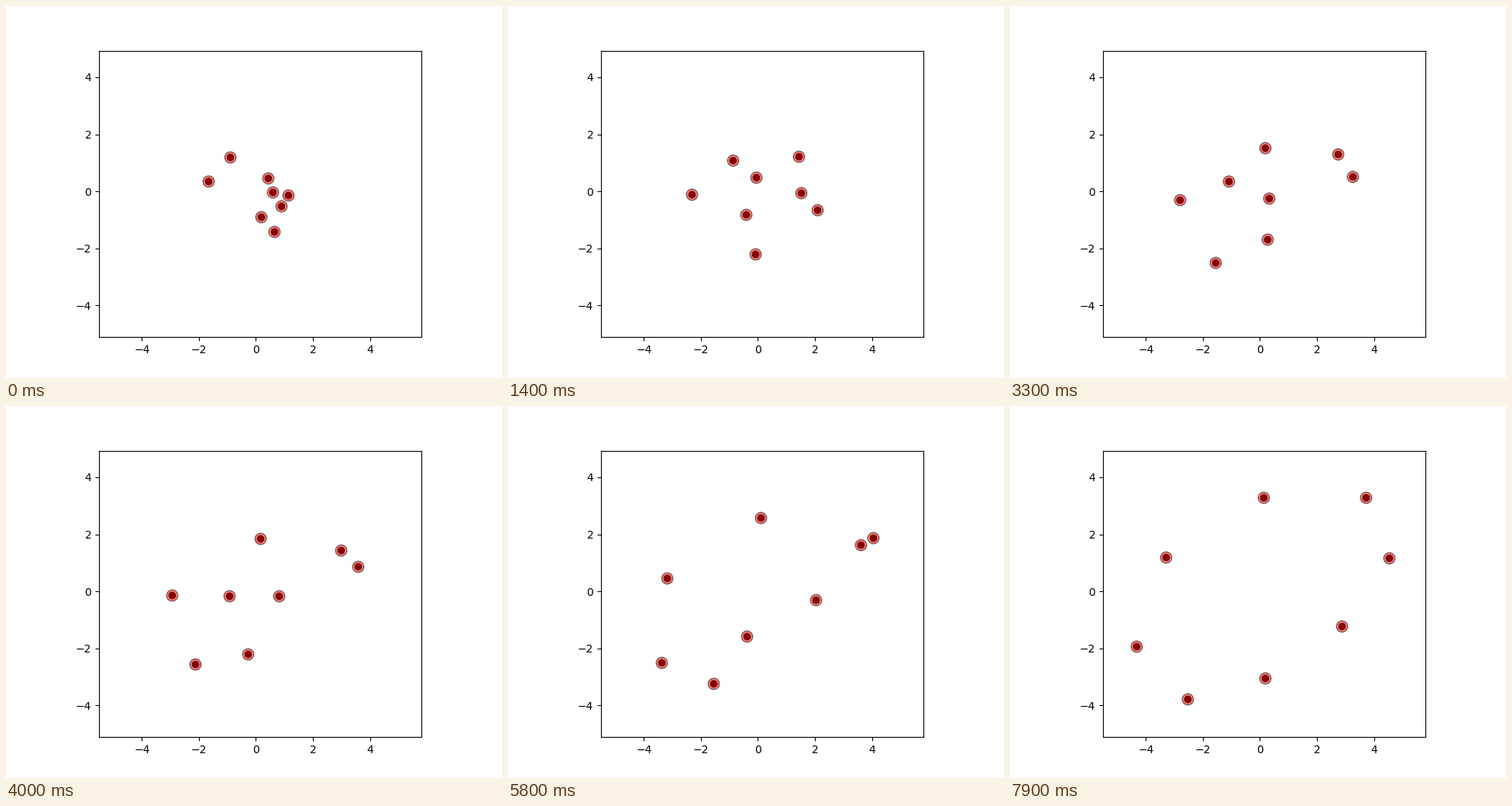
Recreate the animation shown at these times as a matplotlib script. Size 640 px wide and 480 px high, loop 8000 ms.

```python
import numpy as np
import matplotlib.pyplot as plt
from matplotlib.animation import FuncAnimation

FRAMES, INTERVAL = 80, 100
W, H, DPI = 640, 480, 100

# Each body drifts smoothly through a few points, reached at these seconds
KEYS = np.array([0, 1.4, 3.3, 4.8, 7.9])
BODIES = np.array([
    [(-1.67, 0.35), (-2.31, -0.10), (-2.81, -0.29), (-3.08, 0.15), (-3.31, 1.20)],
    [(-0.91, 1.19), (-0.89, 1.09), (-1.11, 0.37), (-0.68, -0.81), (0.19, -3.04)],
    [(0.59, -0.01), (-0.08, 0.49), (0.17, 1.54), (0.12, 2.19), (0.11, 3.29)],
    [(0.42, 0.47), (1.44, 1.24), (2.72, 1.31), (3.21, 1.61), (4.53, 1.16)],
    [(0.87, -0.51), (2.07, -0.65), (3.25, 0.51), (3.87, 1.28), (3.72, 3.29)],
    [(1.12, -0.13), (1.52, -0.04), (0.26, -1.67), (-0.91, -2.71), (-2.54, -3.78)],
    [(0.17, -0.90), (-0.43, -0.81), (0.30, -0.24), (1.43, -0.13), (2.86, -1.22)],
    [(0.64, -1.42), (-0.09, -2.20), (-1.55, -2.49), (-2.75, -2.58), (-4.33, -1.92)],
])
SPEEDS = np.gradient(BODIES, KEYS, axis=1, edge_order=2)


def positions(t):
    """Cubic Hermite position of every body at t seconds."""
    i = min(np.searchsorted(KEYS, t, side="right"), len(KEYS) - 1) - 1
    h = KEYS[i + 1] - KEYS[i]
    s = (t - KEYS[i]) / h
    p, q = BODIES[:, i], BODIES[:, i + 1]
    u, v = SPEEDS[:, i] * h, SPEEDS[:, i + 1] * h
    blend = s * s * (3 - 2 * s)
    return p + (q - p) * blend + s * (1 - s) * ((1 - s) * u - s * v)


fig = plt.figure(figsize=(W / DPI, H / DPI), dpi=DPI)
ax = fig.add_axes([120 / W, 0.11, 416 / W, 0.77])
ticks = range(-4, 5, 2)
ax.set(xlim=(-5.5, 5.8), ylim=(-5.107, 4.933), xticks=ticks, yticks=ticks)

halo = ax.scatter([], [], s=110, facecolor="red", edgecolor="black",
                  linewidth=1, alpha=0.5)
core, = ax.plot([], [], "o", ms=6, color="#800000")


def update(n):
    points = positions(n * INTERVAL / 1000)
    halo.set_offsets(points)
    core.set_data(*points.T)
    return halo, core


anim = FuncAnimation(fig, update, frames=FRAMES, interval=INTERVAL,
                     repeat=True, repeat_delay=0)
plt.show()
```
